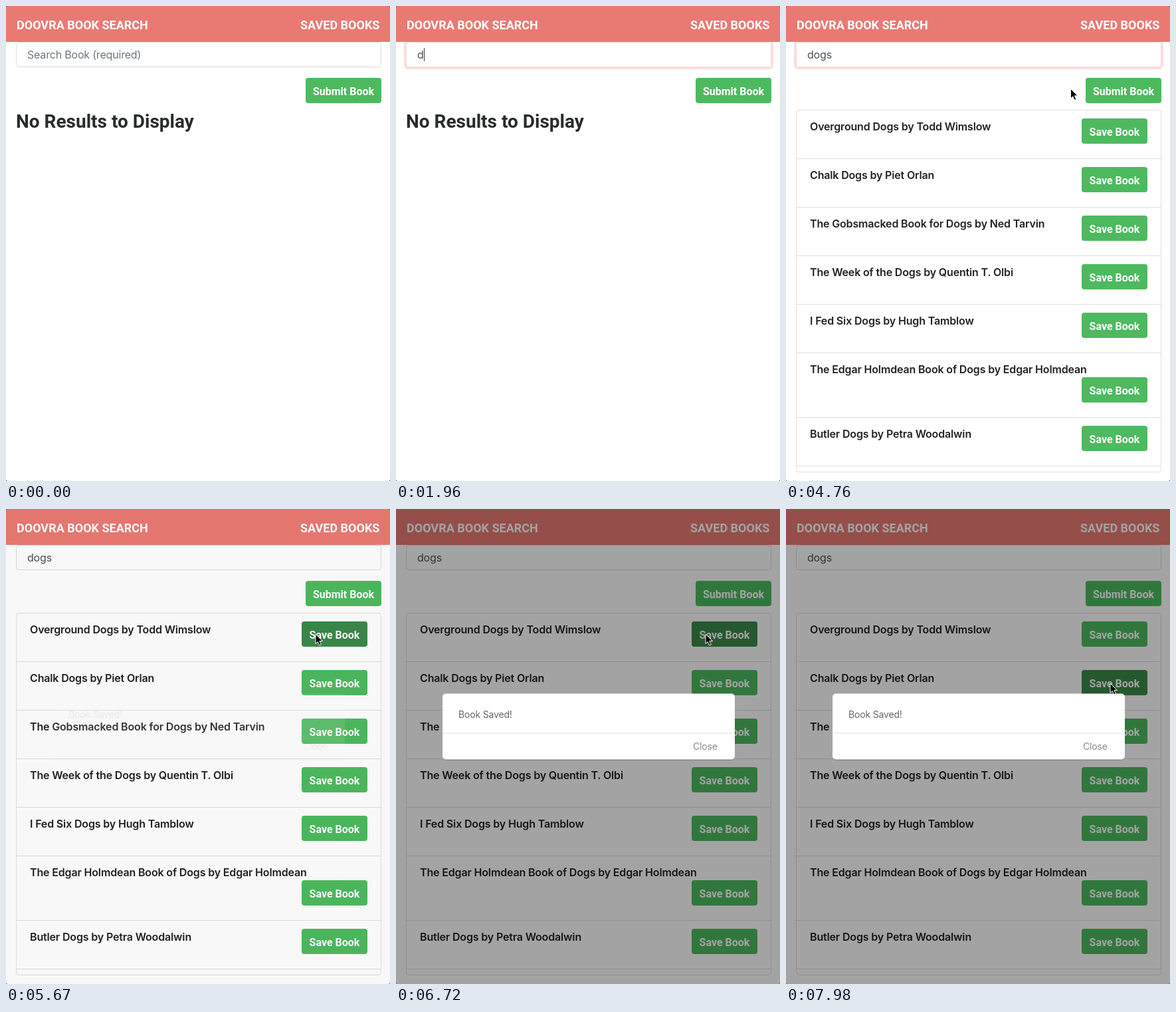
Write an HTML page that moves like this. It is 578 px wide and 714 px high and loops after 8000 ms.

```html
<!DOCTYPE html>
<html lang="en">
<head>
<meta charset="utf-8">
<title>Book search</title>
<style>
html, body { margin: 0; width: 100%; height: 100%; overflow: hidden; background: #fff; }
svg { display: block; width: 578px; height: 714px; }
text { font: 400 16px Inter, "Open Sans", sans-serif; letter-spacing: -.012em; white-space: pre; }
.narrow { font: 600 16px Roboto, "Open Sans", sans-serif; font-stretch: 87.5%; letter-spacing: 0; }
.nav { font-size: 18px; fill: #fff; }
.heading { font-size: 28px; fill: #292b2c; }
.label { fill: #fff; text-anchor: middle; }
.title { font-weight: 600; fill: #212121; letter-spacing: -.01em; }
.small { font-size: 14px; }
</style>
</head>
<body>
<svg id="stage" viewBox="0 0 578 714"></svg>
<script>
const LOOP = 8000, STEP = 70;
const GREEN = '#4dba5f', DARK = '#3b8949', LINE = '#dfdfdf';
const stage = document.getElementById('stage');

function add(parent, tag, attrs, content) {
  const node = document.createElementNS(stage.namespaceURI, tag);
  set(node, attrs);
  if (content) node.textContent = content;
  return parent.appendChild(node);
}
function set(node, attrs) {
  for (const key in attrs) node.setAttribute(key, attrs[key]);
}
const group = parent => add(parent, 'g', {});
const show = (node, on) => { node.style.display = on ? '' : 'none'; };
const rect = (parent, x, y, width, height, attrs) => add(parent, 'rect', { x, y, width, height, ...attrs });
const text = (parent, x, y, content, attrs) => add(parent, 'text', { x, y, ...attrs }, content);
const rule = (parent, x, y, width) => rect(parent, x, y, width, 1, { fill: LINE });

function button(parent, x, y, width, label) {
  const face = rect(parent, x, y, width, 38, { rx: 4, fill: GREEN });
  text(parent, x + width / 2, y + 26, label, { class: 'narrow label' });
  return face;
}

// Search form
const ring = rect(stage, 13.5, 52.5, 553, 41, { rx: 5, fill: 'none', stroke: '#f9dedc', 'stroke-width': 3.2 });
const field = rect(stage, 15.5, 54.5, 549, 37, { rx: 4, fill: '#fff' });
const query = text(stage, 32, 79, '', {});
const caret = rect(stage, 42, 63, 1, 20, { fill: '#333' });
rect(stage, 0, 0, 578, 54, { fill: '#e97a73' });
text(stage, 16, 35, 'DOOVRA BOOK SEARCH', { class: 'narrow nav' });
text(stage, 443, 35, 'SAVED BOOKS', { class: 'narrow nav' });
button(stage, 451, 108, 114, 'Submit Book');
const empty = text(stage, 15, 183, 'No Results to Display', { class: 'narrow heading' });

// Results
const results = group(stage);
rect(results, 15.5, 156.5, 549, 544, { rx: 4, fill: '#fff', stroke: LINE });
const titles = [
  'Overground Dogs by Todd Wimslow',
  'Chalk Dogs by Piet Orlan',
  'The Gobsmacked Book for Dogs by Ned Tarvin',
  'The Week of the Dogs by Quentin T. Olbi',
  'I Fed Six Dogs by Hugh Tamblow',
  'The Edgar Holmdean Book of Dogs by Edgar Holmdean',
  'Butler Dogs by Petra Woodalwin'
];
let rowTop = 156;
const saves = titles.map((title, i) => {
  const extra = i === 5 ? 24 : 0;
  text(results, 36, rowTop + 31, title, { class: 'title' });
  const face = button(results, 445, rowTop + 13 + extra, 99, 'Save Book');
  rowTop += 73 + extra;
  rule(results, 16, rowTop, 548);
  return face;
});

// Dialog
const backdrop = rect(stage, 0, 0, 578, 714, { fill: '#000' });
const dialog = group(stage);
rect(dialog, 71, 279, 438, 99, { rx: 5, fill: '#000', opacity: .2 });
rect(dialog, 70, 277.5, 440, 99, { rx: 5, fill: '#fff' });
text(dialog, 94, 314, 'Book Saved!', { class: 'small', fill: '#666' });
rule(dialog, 70, 336.5, 440);
text(dialog, 447, 362, 'Close', { class: 'small', fill: '#8a8a8a' });

// Pointer, with its tip at 0,0
const pointer = group(stage);
const click = add(pointer, 'circle', { r: 30.5, fill: 'none', stroke: '#111', 'stroke-width': 1.5 });
const arrow = add(pointer, 'path', {
  d: 'M0 0V14.5L3.3 11.5L5.7 17L8.3 15.9L5.9 10.5H10.5Z',
  fill: '#000', stroke: '#fff'
});
const hand = add(pointer, 'path', {
  d: 'M-1.4 1.2Q0-.8 1.4 1.2V6Q3 4.5 4.2 6.4Q6 5.4 7 7.2Q9.4 6.8 9.3 9Q9.3 13 7.3 16H-1L-5.5 10Q-5.6 7.8-3.3 8.6L-1.4 10.5Z',
  fill: '#fff', stroke: '#111'
});

// Corners of the window
for (const [x, y, turn] of [[0, 0, 0], [578, 0, 90], [578, 714, 180], [0, 714, 270]])
  add(stage, 'path', { d: 'M0 0H3Q0 0 0 3Z', fill: '#666', transform: `translate(${x} ${y}) rotate(${turn})` });

const typing = [[1890, 'd'], [2100, 'do'], [2240, 'dog'], [2450, 'dogs']];
const moves = [[4410, 400, 76], [5180, 466, 188], [6790, 466, 188], [7350, 488, 262]];
const fades = [[5600, 0], [5670, .08], [5950, 1], [6720, 1], [7000, 0], [7700, 0], [7980, 1]];
const clicks = [[5460, 5600], [6650, 6720], [7560, 7700]];
const during = (t, from, to) => t >= from && t < to;

function sample(keys, t, column, ease = p => p) {
  if (t <= keys[0][0]) return keys[0][column];
  for (let i = 1; i < keys.length; i++) {
    const a = keys[i - 1], b = keys[i];
    if (t < b[0]) return a[column] + (b[column] - a[column]) * ease((t - a[0]) / (b[0] - a[0]));
  }
  return keys[keys.length - 1][column];
}
const smooth = p => p * p * (3 - 2 * p);

function draw(time) {
  const t = Math.floor(time % LOOP / STEP) * STEP;
  const focused = during(t, 1190, 5460);
  const typed = typing.reduce((word, [at, next]) => t >= at ? next : word, '');

  show(ring, focused);
  set(field, { stroke: focused ? '#f6dad8' : '#d8dadc' });
  query.textContent = typed || 'Search Book (required)';
  set(query, { fill: typed ? '#495057' : '#6c757d' });
  set(caret, { x: typed ? 32.5 + query.getComputedTextLength() : 32 });
  show(caret, focused && (during(t, 1890, 2900) || (t - 1190) % 1000 < 500) && !during(t, 3430, 3920));

  show(empty, t < 3080);
  show(results, t >= 3080);

  const fade = sample(fades, t, 1);
  set(backdrop, { opacity: .36 * fade });
  set(dialog, { opacity: Math.min(1, fade * 1.2) });
  show(backdrop, fade > 0);
  show(dialog, fade > 0);

  const x = sample(moves, t, 1, smooth), y = sample(moves, t, 2, smooth);
  const hovered = fade ? (t < 7000 ? 0 : 1)
    : saves.findIndex((_, i) => x > 445 && during(y, 169 + 73 * i, 207 + 73 * i));
  saves.forEach((face, i) => set(face, { fill: t >= 4410 && i === hovered ? DARK : GREEN }));
  set(pointer, { transform: `translate(${x} ${y})` });
  show(pointer, t >= 4410);
  show(hand, !fade && hovered >= 0);
  show(arrow, fade || hovered < 0);
  show(click, clicks.some(([from, to]) => during(t, from, to)));
}

const start = performance.now();
function tick() {
  draw(performance.now() - start);
  requestAnimationFrame(tick);
}
tick();
</script>
</body>
</html>
```
